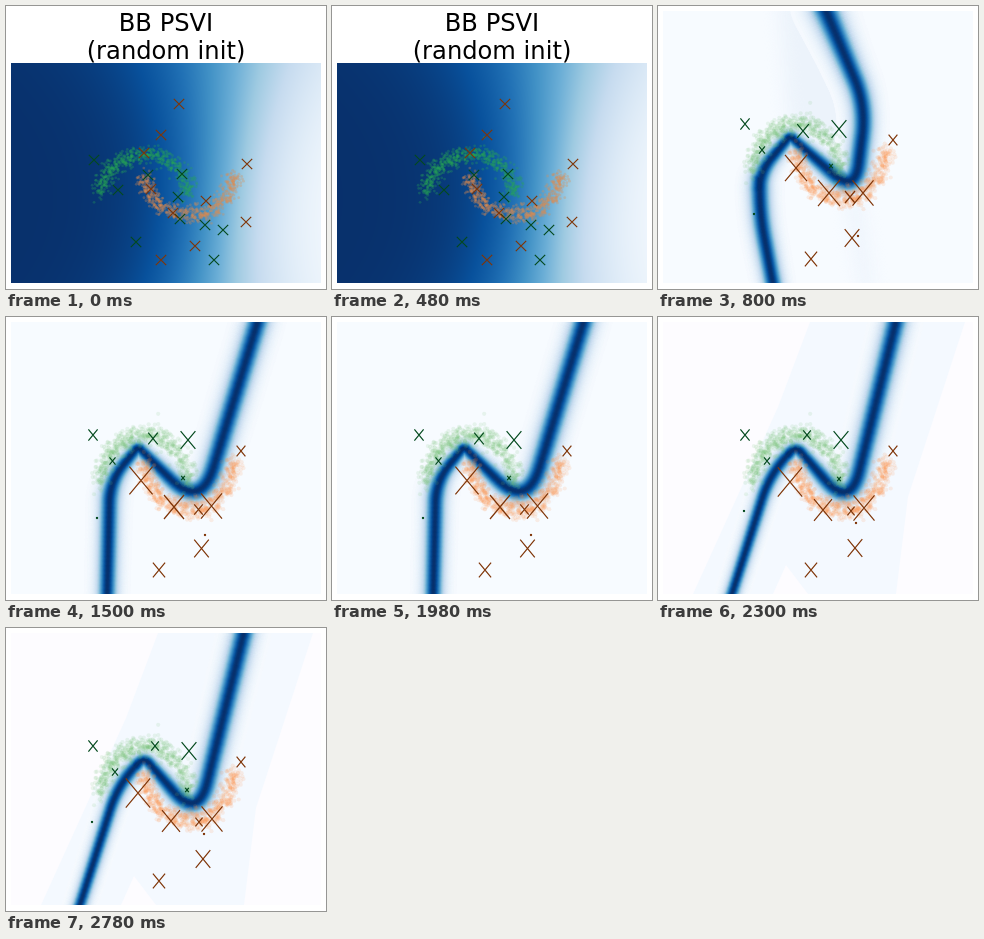
An HTML page with a canvas for the animation above (3100 ms loop, 320 by 283 pixels).

```html
<!DOCTYPE html>
<html lang="en">
<head>
<meta charset="utf-8">
<title>BB PSVI</title>
<style>
html, body { margin: 0; width: 100%; height: 100%; overflow: hidden; background: #fff; }
#strip { position: relative; display: flex; width: 1280px; height: 283px; animation: cut 3100ms step-end infinite; }
canvas { display: block; flex: none; }
h1 {
  position: absolute; left: 0; top: 3px; width: 320px; margin: 0; text-align: center;
  font: 400 24.2px/28px "DejaVu Sans", sans-serif; color: #000; white-space: nowrap;
}
@keyframes cut {
  0% { transform: none; }
  25.806% { transform: translateX(-320px); }
  48.387% { transform: translateX(-640px); }
  74.193% { transform: translateX(-960px); }
}
</style>
</head>
<body>
<div id="strip"><h1>BB PSVI<br>(random init)</h1></div>
<script>
const W = 320, H = 283, LEFT = 5, RIGHT = 315, BOTTOM = 277, FULL = 272;
const BLUES = ['f7fbff', 'deebf7', 'c6dbef', '9ecae1', '6baed6', '4292c6', '2171b5', '08519c', '08306b']
  .map(hex => [0, 2, 4].map(k => parseInt(hex.slice(k, k + 2), 16)));
const GREEN = '#044a1e', BROWN = '#7f3508';

function blues(v) {
  const p = Math.max(0, Math.min(1, v)) * 8, i = Math.min(7, Math.floor(p));
  return BLUES[i].map((c, k) => Math.round(c + (BLUES[i + 1][k] - c) * (p - i)));
}
const rgb = v => `rgb(${blues(v)})`;
const mix = (a, b, u) => a.map((c, k) => c + (b[k] - c) * u);

function addPlot(top) {
  const canvas = document.createElement('canvas');
  canvas.width = W;
  canvas.height = H;
  document.getElementById('strip').append(canvas);
  const g = canvas.getContext('2d');
  g.beginPath();
  g.rect(LEFT, top, RIGHT - LEFT, BOTTOM - top);
  g.clip();
  return g;
}

function polygon(g, fill, pts) {
  g.fillStyle = fill;
  g.beginPath();
  pts.forEach(([x, y]) => g.lineTo(x, y));
  g.fill();
}

// Two noisy half circles; the same seed gives every plot the same data.
function moons(g, top, green, orange, alpha, size) {
  let seed = 7;
  const rand = () => (seed = seed * 16807 % 2147483647) / 2147483647;
  const noise = () => 0.1 * Math.sqrt(-2 * Math.log(rand())) * Math.cos(2 * Math.PI * rand());
  const sy = (BOTTOM - top) / FULL;
  g.globalAlpha = alpha;
  for (let i = 0; i < 1200; i++) {
    const t = Math.PI * rand(), low = i % 2;
    const x = (low ? 1 - Math.cos(t) : Math.cos(t)) + noise();
    const y = (low ? 0.5 - Math.sin(t) : Math.sin(t)) + noise();
    g.fillStyle = low ? orange : green;
    g.beginPath();
    g.arc(139 + 44 * x, top + (163 - 50 * y) * sy, size, 0, 7);
    g.fill();
  }
  g.globalAlpha = 1;
}

function cross(g, color, x, y, r, stretch) {
  const h = r * stretch;
  g.strokeStyle = color;
  g.lineWidth = 1.2;
  g.beginPath();
  g.moveTo(x - r, y - h);
  g.lineTo(x + r, y + h);
  g.moveTo(x - r, y + h);
  g.lineTo(x + r, y - h);
  g.stroke();
}

// Samples a polyline whose inner corners [x, y, radius] are rounded.
function rounded(pts) {
  const toward = (p, q, r) => mix(p, q, r / Math.hypot(q[0] - p[0], q[1] - p[1])).slice(0, 2);
  const keys = [pts[0]];
  const out = [];
  for (let i = 1; i < pts.length - 1; i++) {
    const p = pts[i].slice(0, 2), r = pts[i][2];
    const a = toward(p, pts[i - 1], r), b = toward(p, pts[i + 1], r);
    for (let u = 0; u < 1; u += 0.05) out.push(mix(keys.at(-1), a, u));
    for (let u = 0; u < 1; u += 0.05) out.push(mix(mix(a, p, u), mix(p, b, u), u));
    keys.push(b);
  }
  for (let u = 0; u <= 1.01; u += 0.05) out.push(mix(keys.at(-1), pts.at(-1), u));
  return out;
}

// Boundary with a sech² profile: width runs from `wide` to `thin`, pinched at the bend.
function band(g, path, [bx, by], wide, thin) {
  const line = rounded(path);
  g.lineCap = 'round';
  for (let v = 0.012; v < 1; v += 0.012) {
    const reach = 2 * Math.acosh(1 / Math.sqrt(v));
    g.strokeStyle = rgb(v);
    for (let i = 1; i < line.length; i++) {
      const [x, y] = line[i];
      const w = wide + (thin - wide) * i / line.length;
      g.lineWidth = reach * Math.min(w, 5.8 + Math.hypot(x - bx, y - by) / 22);
      g.beginPath();
      g.moveTo(...line[i - 1]);
      g.lineTo(x, y);
      g.stroke();
    }
  }
  g.lineCap = 'butt';
}

function drawStart() {
  const top = 57, g = addPlot(top);
  const img = g.createImageData(RIGHT - LEFT, BOTTOM - top);
  for (let j = 0, n = 0; j < img.height; j++) {
    const q = (143 - j) / 143, mid = 217 + 12 * q, scale = 33 + 17 * q * q;
    for (let i = 0; i < img.width; i++, n += 4) {
      img.data.set([...blues(1 / (1 + Math.exp((i + LEFT - mid) / scale))), 255], n);
    }
  }
  g.putImageData(img, LEFT, top);
  moons(g, top, '#29a555', '#e08a4c', 0.3, 1.4);
  const green = [[88,154],[142,169],[176,168],[112,184],[172,191],[174,213],[199,219],[217,224],[130,236],[208,254]];
  const brown = [[173,98],[155,129],[138,147],[241,158],[145,183],[200,195],[167,207],[240,216],[189,240],[155,254]];
  for (const [x, y] of green) cross(g, GREEN, x, y, 5.2, 1);
  for (const [x, y] of brown) cross(g, BROWN, x, y, 5.2, 1);
}

// Learned points: x, y, half width, then the drift of each per step.
const POINTS = {
  [GREEN]: [[87,118,4.6], [145,125,5.8,2,-3.5,-1], [181,123,7.4,1], [104,144,3,2.5],
    [173,160,1.8,4,1], [96,208,0.8,-5,-7]],
  [BROWN]: [[235,134,4.4], [138,162,11,-3,1.5,0.6], [171,187,11,-3,3,-1], [205,187,10.5,0.5,2],
    [192,191,5,0.5,1.5,-0.7], [194,232,7.3,1.5,-0.5], [153,253,6.1], [200,230,0.8,-1,-12]]
};

function drawFit(step, path, bend, wide, thin, back) {
  const g = addPlot(5);
  g.fillStyle = rgb(0);
  g.fillRect(0, 0, W, H);
  if (back) back(g);
  band(g, path, bend, wide, thin);
  moons(g, 5, '#74c476', '#fd8d3c', 0.13, 2.1);
  for (const color in POINTS) {
    for (const [x, y, r, dx = 0, dy = 0, dr = 0] of POINTS[color]) {
      cross(g, color, x + dx * step, y + dy * step, r + dr * step, 1.2);
    }
  }
}

function haze(g) {
  g.filter = 'blur(8px)';
  polygon(g, '#ecf3fb', [[120,-10],[170,-10],[206,110],[185,170],[132,130]]);
  polygon(g, '#edf4fc', [[185,170],[200,170],[216,290],[204,290]]);
  g.filter = 'none';
}

function sheet(g) {
  g.fillStyle = '#fdfcff';
  g.fillRect(0, 0, W, H);
  polygon(g, '#f4f9ff', [[152,5],[307,5],[250,180],[238,277],[150,277],[128,248],[115,277],[35,277],[120,90]]);
}

drawStart();
drawFit(0, [[166,0],[208,100,30],[197,187,30],[132,130,4],[102,166,18],[101,203,30],[116,283]],
  [132,130], 12, 8, haze);
drawFit(1, [[253,0],[195,192,44],[132,130,4],[104,164,22],[101,283]], [132,130], 9.8, 8);
drawFit(2, [[239,0],[192,192,40],[138,129,9],[112,157,25],[72,283]], [138,130], 9.5, 6, sheet);
</script>
</body>
</html>
```
